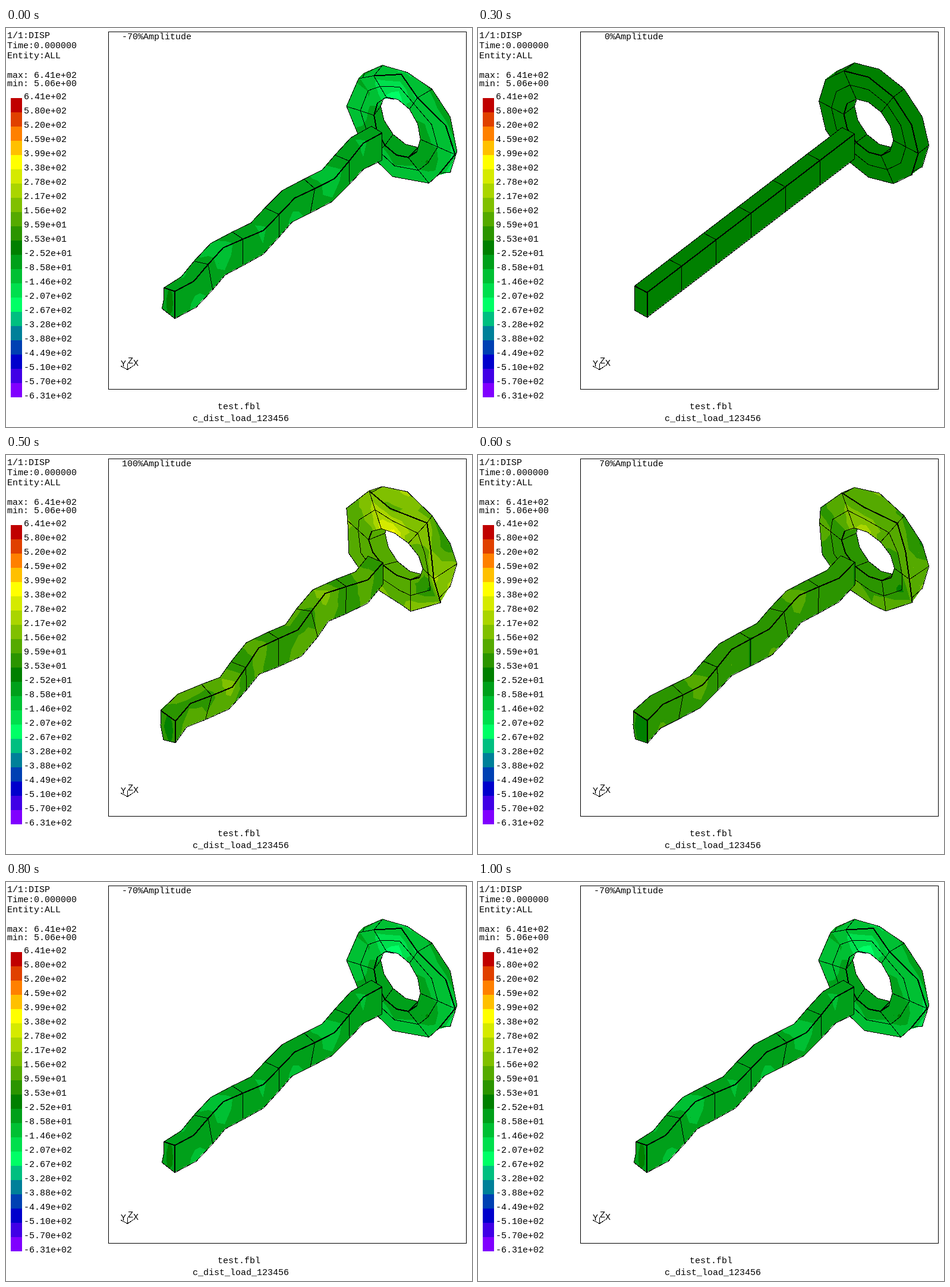
An HTML page for the animation above (1100 ms loop, 784 px wide and 672 px high).

```html
<!DOCTYPE html>
<html lang="en">
<head>
<meta charset="utf-8">
<title>Displacement animation</title>
<style>
  html, body { margin: 0; width: 100%; height: 100%; overflow: hidden; background: #fff; }
  svg { display: block; width: 784px; height: 672px; }
  text { font: 15px "Liberation Mono", "DejaVu Sans Mono", monospace; white-space: pre; }
  .line { fill: none; stroke: #000; stroke-linejoin: round; }
  #legend, #mesh, #frame { shape-rendering: crispEdges; }
</style>
</head>
<body>
<svg viewBox="0 0 784 672">
  <text x="2" y="17">1/1:DISP</text>
  <text x="2" y="34">Time:0.000000</text>
  <text x="2" y="51">Entity:ALL</text>
  <text x="2" y="84">max: 6.41e+02</text>
  <text x="2" y="98">min: 5.06e+00</text>
  <g id="legend"></g>
  <g id="mesh"></g>
  <g id="frame" class="line">
    <path d="M172.5 6.5H774.5V608.5H172.5Z"/>
    <path d="M193.5 569.5L204.5 575.5L214.5 568.5M204.5 575.5V564.5"/>
  </g>
  <text x="193" y="570">Y</text>
  <text x="205" y="565">Z</text>
  <text x="214" y="569">X</text>
  <text id="amp" x="312" y="19" text-anchor="end"></text>
  <text x="356" y="642">test.fbl</text>
  <text x="314" y="662">c_dist_load_123456</text>
</svg>
<script>
const $ = id => document.getElementById(id);
const { sin, cos, PI, max, min, hypot } = Math;
const TOP = 640.765, STEP = 60.543, BANDS = 21, SWING = Math.SQRT1_2;
const list = (n, make) => Array.from({ length: n }, (_, i) => make(i));
const lerp = (a, b, t) => a.map((v, c) => v + (b[c] - v) * t);

// Colour scale, interpolated between a few stops
const stops = [[0, 192, 0, 0], [2, 255, 128, 0], [4, 255, 255, 0], [10, 0, 128, 0],
               [14, 0, 255, 102], [18, 0, 0, 204], [20, 128, 0, 255]];
const colors = list(BANDS, i => {
  const n = max(1, stops.findIndex(s => s[0] >= i));
  const a = stops[n - 1], b = stops[n];
  return `rgb(${lerp(a, b, (i - a[0]) / (b[0] - a[0])).slice(1).map(Math.round)})`;
});

let legend = "";
for (let i = 0; i <= BANDS; i++) {
  const label = (TOP - i * STEP).toExponential(2).replace("+", "+0");
  if (i < BANDS) legend += `<rect x="8" y="${118 + 24 * i}" width="19" height="24" fill="${colors[i]}"/>`;
  legend += `<text x="30" y="${120 + 24 * i}">${label}</text>`;
}
$("legend").innerHTML = legend;

// Every node is [x, y, dx, dy, value]; the last three scale with the amplitude.

// Bar edge: a short bending wave, a twist that flips with the side, and a long sway
const edge = (x, y, side) => list(13, i => {
  const wave = PI * i / 2, sway = PI * i / 6, core = 1 - Math.abs(side);
  const dx = -4 * sin(wave) + 2.8 * side * cos(wave) + 2.6 * sin(sway + .2 - 2.3 * max(side, 0));
  const dy = -(5 + 1.2 * core) * sin(wave) - 2 * side * cos(wave)
    + 3 * core * sin(sway + .7) - 5 * max(-side, 0) * Math.exp(-i);
  return [x + i * 349 / 12, y - i * 267 / 12, dx, dy, 8 + 12 * hypot(dx, dy)];
});
const back = edge(263, 434, -1);
const ridge = edge(284, 445, 0);
const base = edge(284, 487, 1);

// End face, calm in the middle
const left = [back[0], [263, 454.5, -2.5, 0, 45], [263, 475, 1, 3, 45]];
const right = [ridge[0], lerp(ridge[0], base[0], .5), base[0]];
const centre = left.map((p, i) => [...lerp(p, right[i], .5).slice(0, 4), i === 1 ? 5 : 22]);
const cap = [left, centre, right];

// Ring: 12 nodes around a skewed circle, at a radius and depth
const circle = (r, depth, shift) => list(12, i => {
  const a = i * PI / 6, c = r * cos(a), s = r * sin(a);
  return [656.7 - 41.7 * c + 72.3 * s + 18 * depth, 166.7 - 95 * c - 4 * s - 13.5 * depth, ...shift(a)];
});
const bump = (a, at, sharp) => max(0, cos(a - at)) ** sharp;
const outer = circle(1, 0, a => [
  -4.1 - 2.3 * sin(a) + 3.7 * sin(2 * a) - 2.3 * cos(3 * a) - 4.4 * cos(4 * a - .46) + 7 * cos(5 * a),
  -1.2 - 2.1 * cos(a + .72) + 2.3 * cos(2 * a - 1) - 2.2 * cos(4 * a - .5) - 3 * cos(5 * a) - 1.9 * cos(6 * a),
  120 + 22 * cos(6 * a) + 20 * cos(a - 2.1)]);
const inner = circle(.5, 0, a => [
  -1 - 3 * cos(a + .63), 5 * cos(a - .87), 75 + 200 * bump(a, .35, 6)]);
const outerFar = circle(1, 1, a => [
  0, -4 + 9 * sin(a / 2) * cos(3 * a - 3.77), 95 + 75 * cos(3 * a - 1.26)]);
const innerFar = circle(.5, 1, a => [
  3, -14 * bump(a, 0, 12), 70 + 380 * bump(a, 0, 12)]);
const mid = outer.map((p, i) => {
  const m = lerp(p, inner[i], .5);
  m[4] -= 80 * bump(i * PI / 6, 2.6, 8);
  return m;
});

const loop = r => [...r, r[0]];
const path = pts => "M" + pts.map(p => p[0].toFixed(1) + " " + p[1].toFixed(1)).join("L");

// Part of a polygon whose value is at most the given level
function below(poly, level) {
  const out = [];
  poly.forEach((p, i) => {
    const q = poly[(i + 1) % poly.length];
    if (p[2] <= level) out.push(p);
    if ((p[2] <= level) !== (q[2] <= level)) out.push(lerp(p, q, (level - p[2]) / (q[2] - p[2])));
  });
  return out;
}

function render(amp) {
  const k = amp / SWING;
  const pose = ([x, y, dx, dy, v]) => [x + dx * k, y + dy * k, v * k];
  let svg = "";

  const bandOf = v => min(BANDS - 1, max(0, Math.floor((TOP - v) / STEP)));
  const triangle = pts => {
    const values = pts.map(p => p[2]);
    const last = bandOf(min(...values));
    for (let b = bandOf(max(...values)), poly = pts; b <= last; b++) {
      svg += `<path d="${path(poly)}Z" fill="${colors[b]}"/>`;
      poly = below(poly, TOP - (b + 1) * STEP);
      if (poly.length < 3) break;
    }
  };
  const surface = rows => {
    const grid = rows.map(r => r.map(pose));
    for (let j = 0; j + 1 < grid.length; j++)
      for (let i = 0; i + 1 < grid[j].length; i++) {
        const quad = [grid[j][i], grid[j][i + 1], grid[j + 1][i + 1], grid[j + 1][i]];
        const hub = [0, 1, 2].map(c => quad.reduce((s, p) => s + p[c], 0) / 4);
        quad.forEach((p, n) => triangle([p, quad[(n + 1) % 4], hub]));
      }
  };
  const line = (pts, width = 1) => {
    svg += `<path class="line" transform="translate(.5 .5)" stroke-width="${width}" d="${path(pts.map(pose))}"/>`;
  };
  // Element borders fall on every second node
  const sheet = (...rows) => {
    surface(rows);
    rows.forEach(r => line(r));
    for (let i = 0; i < rows[0].length; i += 2) line(rows.map(r => r[i]));
  };

  sheet(loop(inner), loop(innerFar));
  sheet(loop(outer), loop(outerFar));
  sheet(loop(outer), loop(mid), loop(inner));
  line(outer.slice(0, 6), 2);
  line(inner.slice(5), 2);

  sheet(back, ridge, base);
  surface(cap);
  line(left);
  line(cap.map(c => c[2]));
  line([back[0], ridge[0]], 2);
  line(right, 2);
  line(ridge, 2);
  return svg;
}

// One sine cycle spans eight steps; the loop holds eleven
const states = list(11, i => {
  const amp = sin((i - 3) * PI / 4);
  return { svg: render(amp), label: `${Math.trunc(amp * 100)}%Amplitude` };
});

let shown = -1;
const start = performance.now();
function tick() {
  const step = Math.floor((performance.now() - start) / 100) % states.length;
  if (step !== shown) {
    shown = step;
    $("mesh").innerHTML = states[step].svg;
    $("amp").textContent = states[step].label;
  }
  requestAnimationFrame(tick);
}
tick();
</script>
</body>
</html>
```
